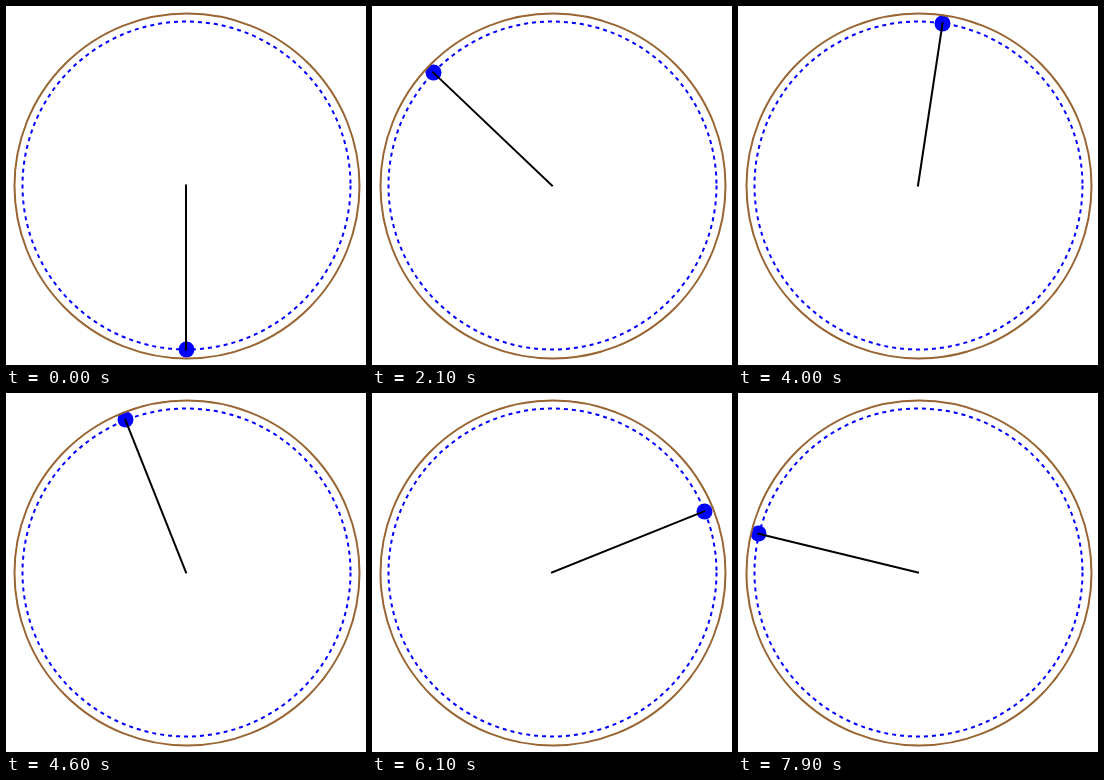
Animation, 360 px wide and 359 px high, one loop 8 s. Source, as an HTML page:

```html
<!DOCTYPE html>
<html>
<head>
<meta charset="utf-8">
<style>
  html, body { margin: 0; width: 100%; height: 100%; overflow: hidden; background: #fff; }
  svg { display: block; }
</style>
</head>
<body>
<svg width="360" height="359" fill="none" stroke-width="2">
  <circle cx="180.5" cy="179.5" r="164" stroke="#00f" stroke-dasharray="4 4"/>
  <circle id="ball" r="8" fill="#00f"/>
  <circle cx="181" cy="180" r="172.5" stroke="#963"/>
  <line id="rod" x1="180" y1="179.5" stroke="#000" stroke-linecap="square"/>
</svg>
<script>
  const STEP = 0.1, COUNT = 80, SUB = 200;
  const GRAVITY = 9.81, LENGTH = 2, START_SPEED = 4.5;
  const CX = 180, CY = 179.5, ARM = 164.2;

  // Pendulum swinging over the top: angle'' = -g/l sin(angle), leapfrog integration.
  const angles = [];
  const h = STEP / SUB;
  let angle = 0, speed = START_SPEED;
  for (let i = 0; i < COUNT; i++) {
    angles.push(angle);
    for (let j = 0; j < SUB; j++) {
      angle += speed * h / 2;
      speed -= GRAVITY / LENGTH * Math.sin(angle) * h;
      angle += speed * h / 2;
    }
  }

  const ball = document.getElementById('ball');
  const rod = document.getElementById('rod');
  const start = performance.now();

  function set(el, attrs) {
    for (const name in attrs) el.setAttribute(name, attrs[name]);
  }

  // The ball sits on whole pixels, the rod does not.
  const snap = v => Math.floor(v) + 0.5;

  function draw(now) {
    const i = Math.floor(Math.max(0, now - start) / (STEP * 1000)) % COUNT;
    const x = CX + ARM * Math.sin(angles[i]);
    const y = CY + ARM * Math.cos(angles[i]);
    set(ball, { cx: snap(x), cy: snap(y) });
    set(rod, { x2: x, y2: y });
    requestAnimationFrame(draw);
  }
  draw(start);
</script>
</body>
</html>
```
